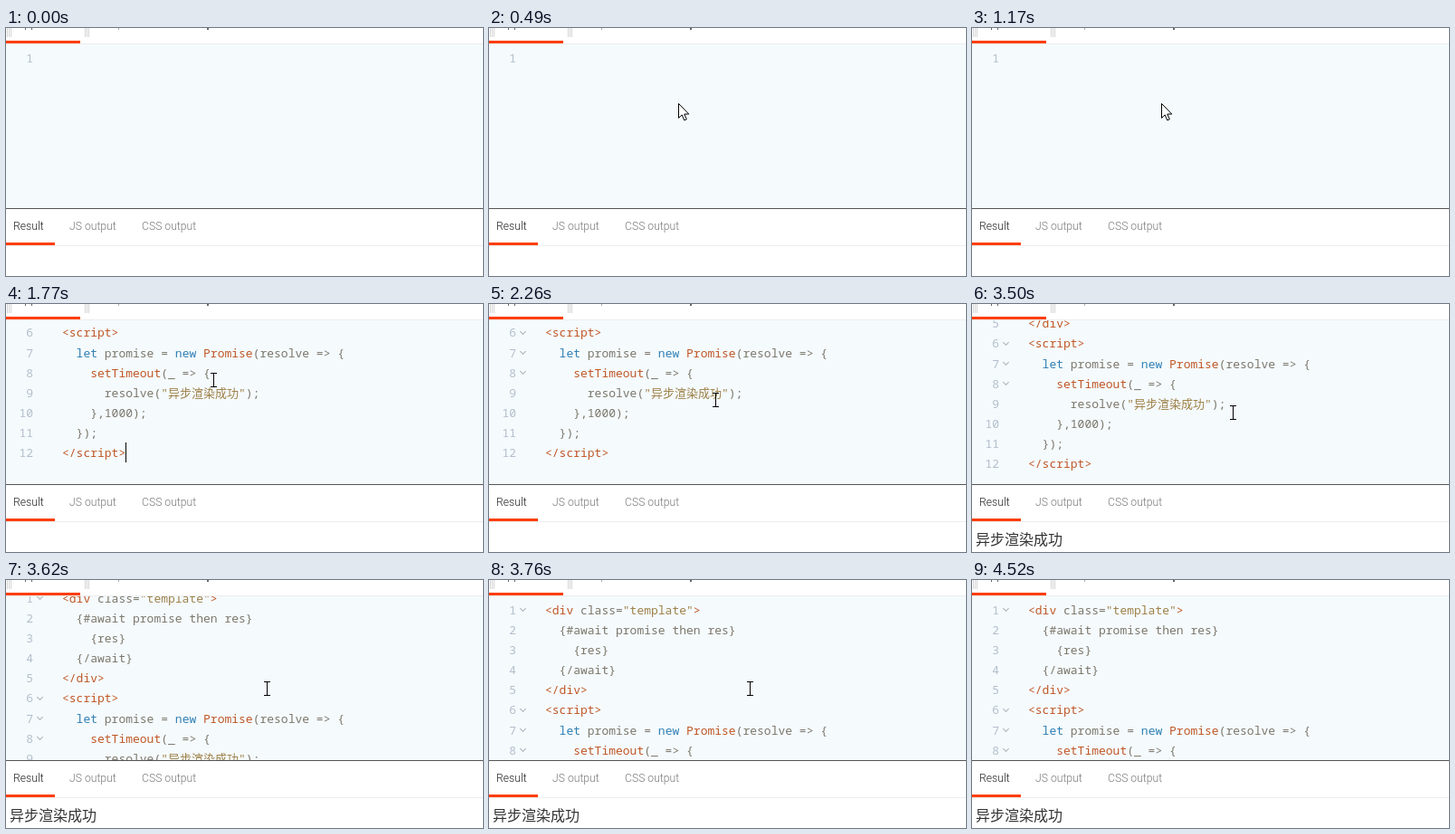
Write an HTML page that moves like this. It is 527 px wide and 274 px high and loops after 4.85 s.

```html
<!DOCTYPE html>
<html lang="zh">
<head>
<meta charset="utf-8">
<style>
html, body { margin: 0; width: 100%; height: 100%; overflow: hidden; background: #fff; }
#stage { position: relative; width: 527px; height: 274px; overflow: hidden; }
#stage div, pre, #fold i, svg { position: absolute; margin: 0; }
.rule { left: 0; width: 527px; height: 1px; background: #eee; }
.bar { left: 0; height: 3px; background: #ff3e00; }
.grip { top: 0; width: 1px; height: 10px; background: #d4d4d4; box-shadow: 2px 0 #d4d4d4, 4px 0 #d4d4d4; }
.stub { top: 0; width: 1px; height: 2px; background: #666; }
.tab { top: 210px; font: 300 12.2px/18px Roboto, sans-serif; color: #777; white-space: nowrap; }
#editor { left: 0; top: 18px; width: 527px; height: 181px; overflow: hidden; background: #f5fafd; }
#doc { left: 0; top: 4px; }
pre { top: 0; font: 13px/22.1px "Noto Sans Mono", "Noto Sans CJK SC", monospace; color: #7b776b; }
#nums { left: 0; width: 30px; text-align: right; color: #b3bfcc; }
#code { left: 62px; }
#code b { font-weight: 400; color: #c05726; }
#code u { text-decoration: none; color: #9d8148; }
#code em { font-style: normal; color: #3080b5; }
#fold i { left: 35px; width: 4px; height: 4px; border: solid #aab2ba; border-width: 0 1px 1px 0; transform: rotate(45deg); }
#caret { width: 1px; height: 22px; background: #000; }
#result { left: 4px; top: 247px; font: 16px/24px "Noto Sans CJK SC", "Noto Sans CJK", sans-serif; color: #333; white-space: nowrap; }
svg { left: 0; top: 0; }
</style>
</head>
<body>
<div id="stage">
  <div class="grip" style="left:1px"></div>
  <div class="grip" style="left:87px"></div>
  <div class="stub" style="left:21px"></div>
  <div class="stub" style="left:28px"></div>
  <div class="stub" style="left:124px;background:#aaa"></div>
  <div class="stub" style="left:222px;width:2px"></div>
  <div class="rule" style="top:17px"></div>
  <div class="bar" style="top:14px;width:82px"></div>
  <div id="editor">
    <div id="doc">
      <pre id="nums"></pre>
      <div id="fold"></div>
      <pre id="code"><b>&lt;div</b> class=<u>"template"</u><b>&gt;</b>
  {#await promise then res}
    {res}
  {/await}
<b>&lt;/div&gt;</b>
<b>&lt;script&gt;</b>
  <em>let</em> promise = <em>new</em> <b>Promise</b>(resolve =&gt; {
    <b>setTimeout</b>(_ =&gt; {
      resolve(<u>"异步渲染成功"</u>);
    },1000);
  });
<b>&lt;/script&gt;</b></pre>
      <div id="caret"></div>
    </div>
  </div>
  <div class="rule" style="top:199px;background:#555"></div>
  <div class="tab" style="left:8px;color:#222">Result</div>
  <div class="tab" style="left:70px">JS output</div>
  <div class="tab" style="left:150px">CSS output</div>
  <div class="rule" style="top:240px"></div>
  <div class="bar" style="top:237px;width:54px"></div>
  <div id="result">异步渲染成功</div>
  <svg width="527" height="274">
    <g id="mouse">
      <path id="arrow" d="M.5.5v16l3.7-3.5 2.6 6 2.5-1.1-2.5-5.8h5z" fill="#fff" stroke="#000"/>
      <path id="beam" d="M-3-7.5h7M.5-7.5v15M-3 7.5h7" fill="none" stroke="#000"/>
    </g>
  </svg>
</div>
<script>
const LOOP = 4850, LINE = 22.1, PASTE = 1710, SCROLL = 3500;
const $ = id => document.getElementById(id);
const show = (el, on) => el.style.visibility = on ? "visible" : "hidden";
const within = (t, a, b) => t >= a && t < b;

// Pointer moves: start, end, number of steps, first point, last point
const moves = [
  [70, 490, 7, [479, 260], [209, 83]],
  [1300, 1440, 3, [214, 86], [235, 94]],
  [1710, 1770, 2, [232, 88], [229, 84]],
  [1840, 2190, 6, [230, 85], [236, 94]],
  [2260, 2530, 5, [250, 106], [343, 175]],
  [2680, 2820, 3, [335, 168], [298, 134]],
  [2890, 2960, 2, [292, 126], [288, 120]],
  [3910, 4390, 7, [289, 116], [479, 260]],
  [4450, 4450, 1, [480, 266], [480, 266]],
];
const scrollTops = [100, 55, 13, 1, 0];

for (const n of [1, 6, 7, 8]) {
  const mark = $("fold").appendChild(document.createElement("i"));
  mark.style.top = (n - 1) * LINE + 7 + "px";
}

function pointer(t) {
  const [start, end, steps, a, b] = moves.findLast(m => m[0] <= t) || moves[0];
  const last = Math.max(1, steps - 1);
  const step = end > start ? Math.floor((t - start) / (end - start) * last + 0.05) : 0;
  const p = Math.min(1, step / last);
  const k = steps === 7 ? p * p * (3 - 2 * p) : p;
  return a.map((v, i) => Math.round(v + (b[i] - v) * k));
}

function scrollTop(t) {
  if (t < PASTE) return 0;
  if (t < SCROLL) return 112;
  return scrollTops[Math.min(4, Math.floor((t - SCROLL) / 60))];
}

function draw(t) {
  const pasted = t >= PASTE;
  $("nums").textContent = Array.from({ length: pasted ? 12 : 1 }, (_, i) => i + 1).join("\n");
  show($("code"), pasted);
  show($("fold"), t >= 2120);
  show($("result"), t >= 2890);
  $("doc").style.top = 4 - scrollTop(t) + "px";

  show($("caret"), within(t, 630, 1170) || within(t, PASTE, 2260) || within(t, 2820, 3360));
  $("caret").style.left = pasted ? "132px" : "62px";
  $("caret").style.top = (pasted ? 11 * LINE : 0) + "px";

  const [x, y] = pointer(t);
  const on = within(t, 70, 4520), isArrow = t < 1300 || y > 195;
  $("mouse").setAttribute("transform", `translate(${x} ${y})`);
  show($("arrow"), on && isArrow);
  show($("beam"), on && !isArrow);
}

const begin = performance.now();
function frame() {
  draw((performance.now() - begin) % LOOP);
  requestAnimationFrame(frame);
}
frame();
</script>
</body>
</html>
```
